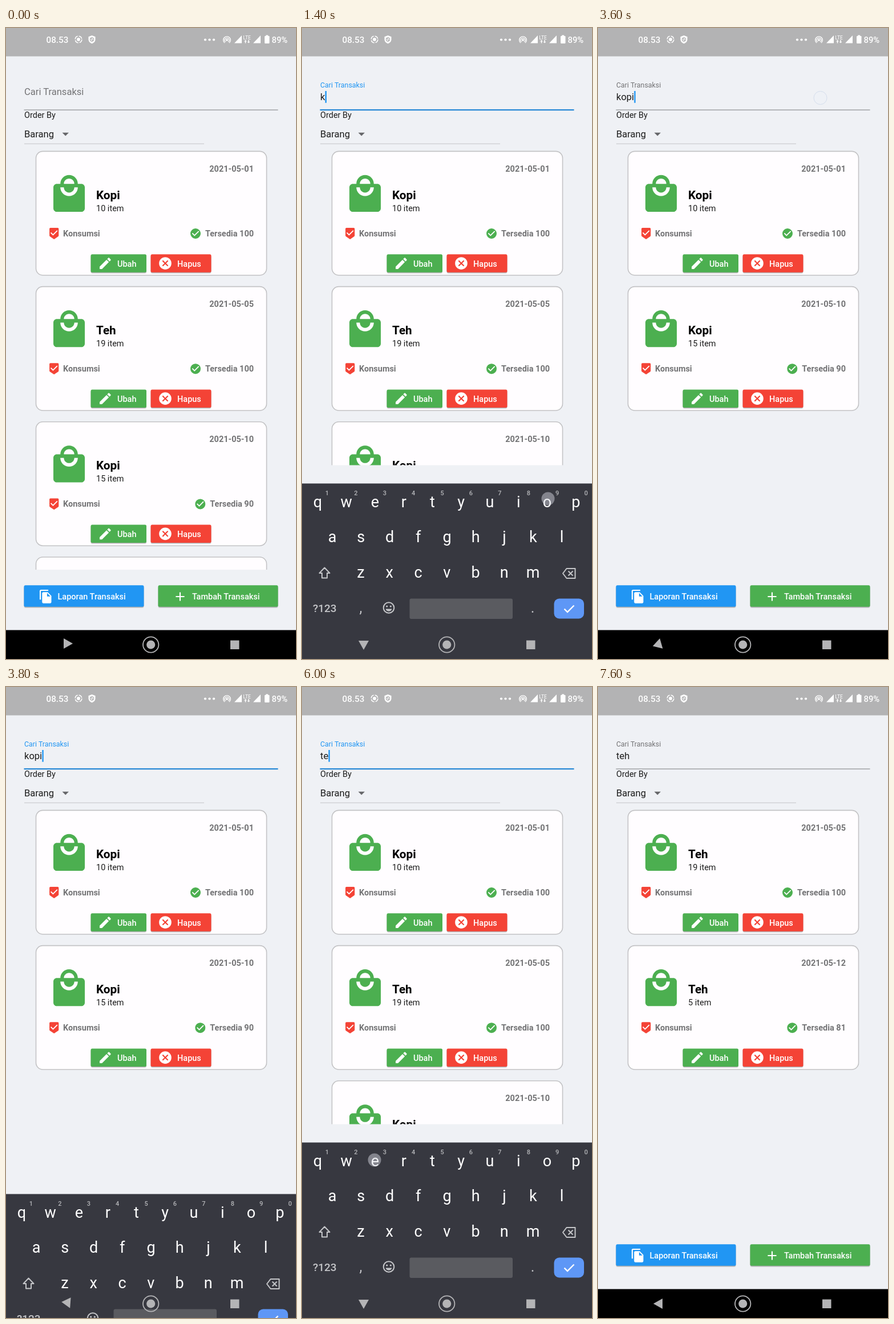
These frames come from a looping animation (508x1102 px, 8000 ms). An HTML page:

```html
<!DOCTYPE html>
<html lang="id">
<head>
<meta charset="utf-8">
<title>Cari Transaksi</title>
<style>
html, body { margin: 0; width: 100%; height: 100%; overflow: hidden; background: #eff1f5; }
svg { display: block; width: 508px; height: 1102px; font-family: Roboto, sans-serif; font-size: 14.49px; }
text { white-space: pre; }
.body { font-size: 16.56px; }
.bold { font-weight: 700; }
.med { font-weight: 500; }
.mid { text-anchor: middle; }
.end { text-anchor: end; }
</style>
</head>
<body>
<svg id="stage" viewBox="0 0 508 1102"></svg>
<script>
const GREEN = '#4caf50', RED = '#f44336', BLUE = '#2196f3', GREY = '#737375', KEY = '#c4c5c8';
const LOOP = 8000, PITCH = 236.2;

const ICONS = {
  bag: 'M19 6h-2c0-2.76-2.24-5-5-5S7 3.24 7 6H5c-1.1 0-2 .9-2 2v12c0 1.1.9 2 2 2h14c1.1 0 2-.9 2-2V8c0-1.1-.9-2-2-2zm-7-3c1.66 0 3 1.34 3 3H9c0-1.66 1.34-3 3-3zm0 10c-2.76 0-5-2.24-5-5h2c0 1.66 1.34 3 3 3s3-1.34 3-3h2c0 2.76-2.24 5-5 5z',
  badge: 'M19 1H5c-1.1 0-2 .9-2 2v12.9c0 .7.35 1.3.88 1.66L12 23l8.1-5.4c.53-.36.9-.97.9-1.66V3c0-1.1-.9-2-2-2zm-9 15l-5-5 1.4-1.4 3.6 3.6 7.6-7.6L19 7z',
  check: 'M12 2a10 10 0 1 0 0 20a10 10 0 1 0 0-20zm-2 15l-5-5 1.4-1.4 3.6 3.6 7.6-7.6L19 8z',
  cancel: 'M12 2a10 10 0 1 0 0 20a10 10 0 1 0 0-20zm5 13.6L15.6 17 12 13.4 8.4 17 7 15.6l3.6-3.6L7 8.4 8.4 7l3.6 3.6L15.6 7 17 8.4 13.4 12z',
  pencil: 'M3 17.25V21h3.75L17.8 9.94l-3.75-3.75zM20.7 7.04c.4-.39.4-1.02 0-1.41l-2.33-2.34c-.39-.39-1.02-.39-1.41 0l-1.83 1.83 3.75 3.75z',
  copy: 'M16 1H4c-1.1 0-2 .9-2 2v14h2V3h12zm-1 4l6 6v10c0 1.1-.9 2-2 2H8c-1.1 0-2-.9-2-2V7c0-1.1.9-2 2-2zm-1 7h5.5L14 6.5z',
  plus: 'M19 13h-6v6h-2v-6H5v-2h6V5h2v6h6z'
};

const ITEMS = [
  ['2021-05-01', 'Kopi', 10, 100],
  ['2021-05-05', 'Teh', 19, 100],
  ['2021-05-10', 'Kopi', 15, 90],
  ['2021-05-12', 'Teh', 5, 81]
];
const ALL = [0, 1, 2, 3], KOPI = [0, 2], TEH = [1, 3];

const rect = (x, y, w, h, fill, rx = 0, more = '') =>
  `<rect x="${x}" y="${y}" width="${w}" height="${h}" fill="${fill}" rx="${rx}" ${more}/>`;
const circle = (x, y, r, fill, more = '') => `<circle cx="${x}" cy="${y}" r="${r}" fill="${fill}" ${more}/>`;
const path = (d, fill, more = '') => `<path d="${d}" fill="${fill}" ${more}/>`;
const line = (d, color, width, more = '') => path(d, 'none', `stroke="${color}" stroke-width="${width}" ${more}`);
const text = (x, y, str, fill, cls = '', more = '') =>
  `<text x="${x}" y="${y}" fill="${fill}" class="${cls}" ${more}>${str}</text>`;
const icon = (name, x, y, scale, fill) =>
  path(ICONS[name], fill, `transform="translate(${x} ${y}) scale(${scale})"`);

const button = (x, y, w, h, fill, label, labelX) =>
  rect(x, y + 2.2, w, h, '#000', 3, 'opacity=".13"') + rect(x, y + 1, w, h, '#000', 3, 'opacity=".2"') +
  rect(x, y, w, h, fill, 2.5) + text(labelX, y + h / 2 + 6, label, '#fff', 'med');

function card([date, name, count, stock], i) {
  return `<g id="card${i}">` +
    rect(52.5, 215.4, 404, 216.4, '#fffdff', 12, 'stroke="#c3c3c5" stroke-width="1.6"') +
    text(434, 251, date, GREY, 'bold end') +
    icon('bag', 73.8, 253.8, 3.06, GREEN) +
    text(158, 299, name, '#000', 'bold', 'font-size="20.7"') +
    text(158, 320, count + ' item', '#1c1c1c') +
    icon('badge', 73.4, 348.2, .9, RED) + text(100, 364, 'Konsumsi', GREY, 'bold') +
    icon('check', stock > 99 ? 321.2 : 329.5, 348.2, .9, GREEN) +
    text(434, 364, 'Tersedia ' + stock, GREY, 'bold end') +
    button(148.5, 395.2, 97.5, 31.5, GREEN, 'Ubah', 195) + icon('pencil', 160.8, 398, 1.09, '#fff') +
    button(253.5, 395.2, 106, 31.5, RED, 'Hapus', 300) + icon('cancel', 266, 398, 1.08, '#fff') + '</g>';
}

function statusBar() {
  const signal = x => path(`M${x} 26.5h13V13z`, '#fff');
  return rect(0, 0, 508, 49.5, '#b3b3b4') +
    text(70.5, 26, '08.53', '#fff', 'med', 'font-size="15.2"') +
    circle(127, 20, 3, '#fff') +
    circle(127, 20, 5.8, 'none', 'stroke="#fff" stroke-width="1.5" stroke-dasharray="7.1 2"') +
    path('M150.5 13l6 2.3v4.4c0 3.6-2.5 6.300-6 7.600c-3.500-1.300-6-4-6-7.600v-4.400z', '#fff') +
    circle(150.5, 20, 3, 'none', 'stroke="#b3b3b4" stroke-width="1.3"') + line('M148.500 18l4 4', '#b3b3b4', 1.3) +
    [349, 356.5, 364].map(x => circle(x, 20.5, 2.1, '#fff')).join('') +
    circle(387, 21, 1.9, '#fff') +
    line('M384.500 24.500a4 4 0 1 1 5 0M383 26a6.300 6.300 0 1 1 8 0', '#fff', 1.4) +
    signal(400) + signal(433) +
    text(415.5, 20, 'LTE', '#fff', '', 'font-size="8.6"') +
    path('M419.500 20.800l2.300 2.700h-1.500v3h-1.600v-3h-1.500z', '#fff', 'id="up"') +
    path('M425 26.600l2.300-2.700h-1.500v-3h-1.600v3h-1.500z', '#fff', 'id="down"') +
    rect(453, 14, 8.5, 13, '#fff', 1.2) + rect(455.2, 12.5, 4, 2, '#fff') +
    text(465.5, 26, '89%', '#fff', 'med', 'font-size="14.8"');
}

function keyboard() {
  const row = (keys, x, y) => [...keys].map((k, i) =>
    text(x + i * 50.25, y, k, '#fff', 'mid', 'font-size="27"')).join('');
  const hints = [...'1234567890'].map((k, i) =>
    text(44 + i * 50.4, 816, k, '#b5b6b9', 'mid med', 'font-size="11"')).join('');
  return rect(0, 795.5, 508, 420, '#373840') + hints +
    row('qwertyuiop', 27.5, 837) + row('asdfghjkl', 53, 898) + row('zxcvbnm', 103, 960) +
    line('M39.500 942.500l9 9.500h-4.500v8.500h-9v-8.500h-4.500z', KEY, 2, 'stroke-linejoin="round"') +
    line('M463.500 944h15v17h-15l-6.500-8.500zM466.500 948.500l8 8m0-8l-8 8', KEY, 2, 'stroke-linejoin="round"') +
    text(19, 1019.5, '?123', KEY, 'med', 'font-size="19"') +
    text(103, 1021, ',', KEY, 'mid', 'font-size="25"') + text(404, 1021, '.', KEY, 'mid', 'font-size="25"') +
    circle(152, 1012.5, 9.3, 'none', `stroke="${KEY}" stroke-width="2"`) +
    circle(148.7, 1010, 1.6, KEY) + circle(155.3, 1010, 1.6, KEY) + path('M146.500 1014.500h11a5.700 5.700 0 0 1-11 0z', KEY) +
    rect(188.5, 996.5, 180.500, 35.5, '#5a5b60', 3) +
    rect(441.5, 996.5, 52.5, 35, '#5e97f6', 9, 'id="enter"') +
    line('M459.500 1014.500l5.500 5.500l11.500-11.500', '#fff', 2.4);
}

const $ = id => document.getElementById(id);
$('stage').innerHTML =
  `<defs><clipPath id="clip"><rect id="clipBox" y="205" width="508" height="741"/></clipPath></defs>` +
  rect(0, 0, 508, 1102, '#eff1f5') + statusBar() +
  text(32, 117, 'Cari Transaksi', GREY, '', 'id="label"') +
  text(32, 125.5, '', '#1c1c1c', 'body', 'id="query"') +
  rect(40, 110, 2.4, 20.7, BLUE, 0, 'id="caret"') + rect(31.5, 142.5, 445, 1.2, '#8e8f92', 0, 'id="rule"') +
  text(32, 157, 'Order By', '#1c1c1c') + text(32, 190.700, 'Barang', '#1c1c1c', 'body') +
  path('M98.500 182.800h11.500l-5.750 5.600z', '#66676a') + rect(32, 201.700, 315, 1, '#c3c4c8') +
  `<g clip-path="url(#clip)">${ITEMS.map(card).join('')}</g>` +
  button(31.5, 973.2, 210, 37.5, BLUE, 'Laporan Transaksi', 90.5) + icon('copy', 56.8, 979.8, 1.08, '#fff') +
  button(266.5, 973.2, 210, 37.5, GREEN, 'Tambah Transaksi', 326) + icon('plus', 292, 980, 1.08, '#fff') +
  rect(0, 1051.5, 508, 51, '#000') + `<g id="keys">${keyboard()}</g>` +
  path('M-10 1L6-8V10z', '#b4b4b6', 'id="back"') +
  circle(253.700, 1077, 13.7, 'none', 'stroke="#b4b4b6" stroke-width="1.8"') + circle(253.700, 1077, 7.6, '#b4b4b6') +
  rect(393, 1069.5, 15.5, 15.5, '#b4b4b6') +
  circle(0, 0, 11.5, '#dfe3ea', 'id="touch"');

// Each step holds until the next and changes only the listed values.
// keys: how far the keyboard is pushed down; turn: angle of the back arrow;
// touch: x, y, opacity of the finger mark.
const HIDDEN = 310;
const STEPS = [
  [0, { query: '', list: ALL, caret: 0, keys: HIDDEN, turn: 180, float: 0, focus: 0, touch: null, ring: 0, press: 0, up: 1, down: 1 }],
  [200, { keys: 70, turn: 255, float: .7, focus: 1, caret: 1 }],
  [400, { keys: 6, turn: 270, float: 1 }],
  [600, { keys: 0 }],
  [1000, { touch: [404, 886, .45] }],
  [1200, { query: 'k', touch: null }],
  [1400, { touch: [431, 822, .45] }],
  [1600, { query: 'ko', touch: [481, 826, .45] }],
  [1800, { query: 'kop', list: KOPI, touch: [379, 826, .45] }],
  [2000, { query: 'kopi', touch: null }],
  [2400, { caret: 0 }],
  [2800, { keys: 67, turn: 193, touch: [470, 1003, .22] }],
  [3000, { keys: HIDDEN, turn: 30, focus: 0, touch: null }],
  [3200, { turn: 0 }],
  [3400, { touch: [389.500, 122, .9], ring: 1 }],
  [3600, { turn: 103, caret: 1, touch: [389.500, 122, .5] }],
  [3800, { keys: 90, turn: 245, focus: 1, touch: null, ring: 0 }],
  [4000, { keys: 0, turn: 270 }],
  [4200, { touch: [468, 951, .45] }],
  [4400, { query: 'kop', touch: [468, 951, .15] }],
  [4600, { query: 'ko', touch: [468, 951, .4] }],
  [4800, { query: 'k', touch: [468, 951, .12], up: .45 }],
  [5000, { query: '', touch: [468, 951, .4] }],
  [5200, { list: ALL, touch: null, up: 1 }],
  [5400, { touch: [228, 826, .45] }],
  [5600, { query: 't', touch: null }],
  [5800, { touch: [127, 826, .45] }],
  [6000, { query: 'te' }],
  [6200, { touch: null }],
  [6400, { touch: [303, 888, .45] }],
  [6600, { query: 'teh', list: TEH, touch: null, up: .55, down: .55 }],
  [7000, { caret: 0, touch: [457.500, 1003, .8], press: 1 }],
  [7200, { keys: 110, turn: 160, touch: null, press: 0 }],
  [7400, { keys: HIDDEN, turn: 15, focus: 0, up: 1, down: 1 }],
  [7600, { turn: 0 }]
];
let state = {};
const POSES = STEPS.map(([at, change]) => [at, state = { ...state, ...change }]);

function set(id, attrs) {
  for (const name in attrs) $(id).setAttribute(name, attrs[name]);
}

function draw(s) {
  set('label', { y: 117 - 13 * s.float, 'font-size': 16.56 - 4.14 * s.float, fill: s.focus ? BLUE : GREY });
  $('query').textContent = s.query;
  set('caret', { x: 32.200 + $('query').getComputedTextLength(), opacity: s.caret });
  set('rule', s.focus ? { y: 141.9, height: 2.3, fill: '#2b8ad6' } : { y: 142.5, height: 1.2, fill: '#8e8f92' });
  ITEMS.forEach((_, i) => {
    const place = s.list.indexOf(i);
    set('card' + i, { display: place < 0 ? 'none' : 'inline', transform: `translate(0 ${place * PITCH})` });
  });
  set('clipBox', { height: (s.keys ? 946 : 763.5) - 205 });
  set('keys', { transform: `translate(0 ${s.keys})`, display: s.keys < HIDDEN ? 'inline' : 'none' });
  set('enter', { fill: s.press ? '#4a86dc' : '#5e97f6' });
  set('back', { transform: `translate(107 1076) rotate(${s.turn})` });
  const [cx, cy, opacity] = s.touch || [0, 0, 0];
  set('touch', { cx, cy, opacity, fill: s.ring ? '#eef1f7' : '#dfe3ea', stroke: s.ring ? '#b9c9e2' : 'none' });
  set('up', { opacity: s.up });
  set('down', { opacity: s.down });
}

const start = performance.now();
let shown;
function tick() {
  const time = (performance.now() - start) % LOOP;
  const pose = POSES.findLast(([at]) => at <= time);
  if (pose !== shown) draw((shown = pose)[1]);
  requestAnimationFrame(tick);
}
tick();
</script>
</body>
</html>
```
